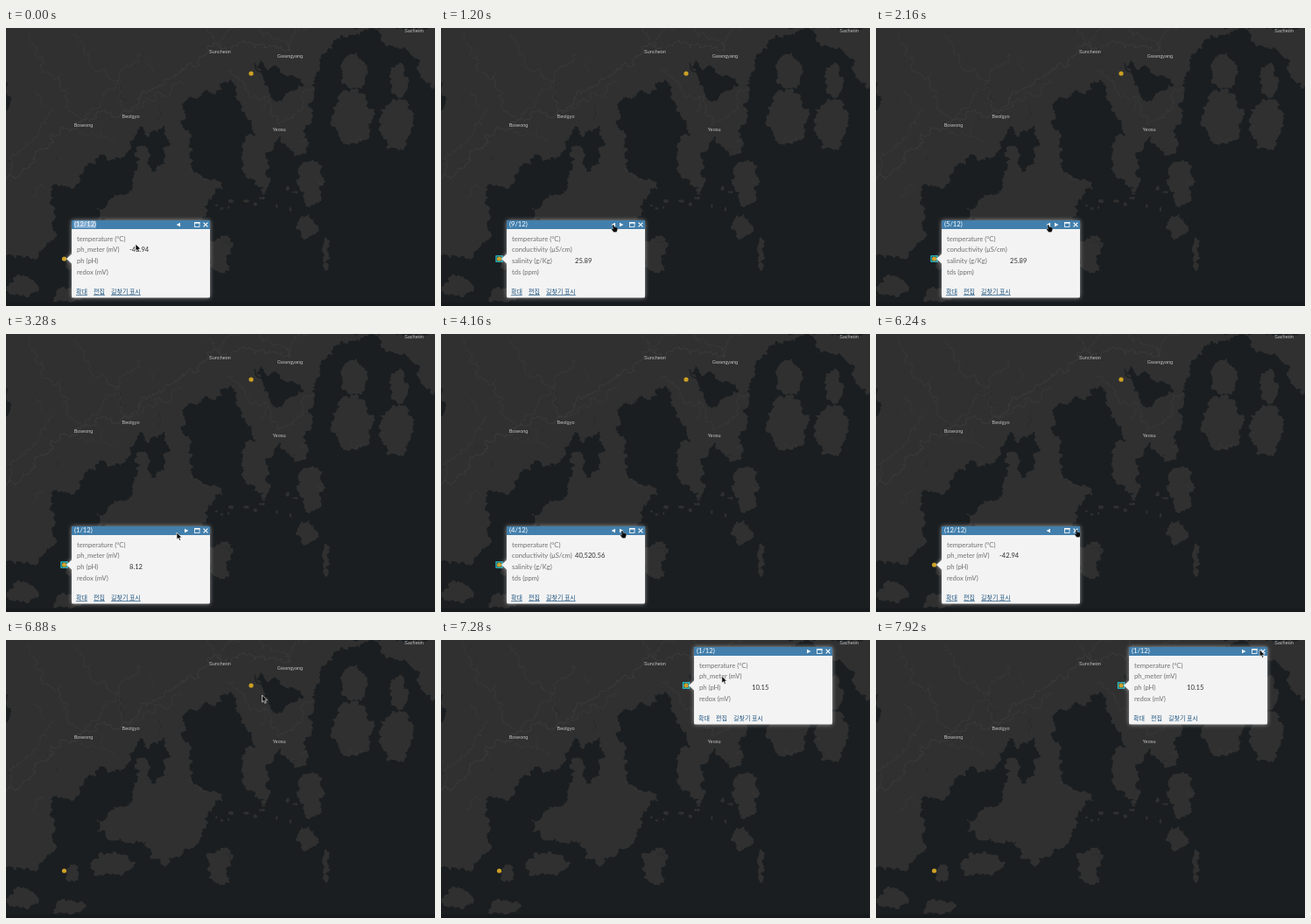
An HTML page with a canvas that plays this animation: 490 by 318 pixels, repeating every 8000 ms.

```html
<!DOCTYPE html>
<html lang="en">
<head>
<meta charset="utf-8">
<title>Sensor map</title>
<style>
  html, body { margin: 0; width: 490px; height: 318px; overflow: hidden; background: #1a1e21; }
  canvas { display: block; }
</style>
</head>
<body>
<canvas id="stage" width="490" height="318"></canvas>
<script>
const W = 490, H = 318, LOOP = 8000, STEP = 80;
const ctx = document.getElementById('stage').getContext('2d');

let seed = 4211;
const random = () => (seed = seed * 16807 % 2147483647) / 2147483647;
const points = text => text.split(' ').map(p => p.split(',').map(Number));
const clamp = (v, low, high) => Math.min(high, Math.max(low, v));

// ---------- map ----------
// A few corner points per coast; the jagged outline is generated.
const COASTS = [
  '-9,-9 300,-9 290,40 262,66 246,63 240,75 207,82 204,98 183,113 160,124 153,112 134,148 106,148 84,172 50,182 55,212 46,248 30,264 -9,268',
  '183,98 204,94 210,126 214,152 250,184 226,204 222,226 196,248 181,260 165,250 160,230 130,226 104,218 103,206 132,190 145,178 148,142 162,138 166,164 182,148',
  '270,40 290,46 304,84 340,66 352,76 346,136 334,146 314,124 296,146 300,180 280,172 268,136 284,124 270,90 262,64',
  '280,-9 500,-9 500,72 476,58 462,30 444,22 424,2 384,8 358,36 354,64 340,68 324,54 300,48 280,38'
];
// Islands: centre and radii.
const ISLANDS = [[398, 50, 15, 20], [396, 104, 23, 34], [450, 60, 10, 19], [445, 110, 20, 29], [349, 174, 16, 26],
  [121, 256, 25, 14], [245, 258, 14, 20], [344, 226, 12, 13], [365, 260, 4, 19], [76, 267, 8, 10], [18, 296, 19, 11], [72, 305, 18, 9]];
const TOWNS = [['Boseong', 88.5, 113], ['Beolgyo', 142.5, 103], ['Suncheon', 244.5, 29.2], ['Gwangyang', 324.5, 34],
  ['Yeosu', 312, 118.3], ['Sacheon', 466, 4.5]];

// Midpoint displacement; long edges stray no further than short ones.
function roughLine(g, a, b, amount) {
  const dx = b[0] - a[0], dy = b[1] - a[1], length = Math.hypot(dx, dy);
  if (length < 2.2) return g.lineTo(b[0], b[1]);
  const k = (random() - .5) * amount * Math.min(1, 16 / length);
  const mid = [(a[0] + b[0]) / 2 - dy * k, (a[1] + b[1]) / 2 + dx * k];
  roughLine(g, a, mid, amount);
  roughLine(g, mid, b, amount);
}

function roughPath(g, list, amount) {
  g.beginPath();
  g.moveTo(...list[0]);
  for (let i = 1; i < list.length; i++) roughLine(g, list[i - 1], list[i], amount);
}

function strokeRough(g, list, colour, width, amount) {
  roughPath(g, list, amount);
  g.strokeStyle = colour;
  g.lineWidth = width;
  g.stroke();
}

function fillLand(g, list) {
  roughPath(g, [...list, list[0]], .75);
  g.fill();
}

function fillIsland(g, x, y, rx, ry) {
  fillLand(g, Array.from({ length: 9 }, (_, i) => {
    const a = i / 9 * Math.PI * 2, r = .85 + random() * .3;
    return [x + Math.cos(a) * rx * r, y + Math.sin(a) * ry * r];
  }));
}

function newLayer() {
  const canvas = document.createElement('canvas');
  canvas.width = W;
  canvas.height = H;
  return canvas.getContext('2d');
}

function drawMap() {
  const g = newLayer(), m = newLayer();
  g.fillStyle = '#303030';
  COASTS.forEach(coast => fillLand(g, points(coast)));
  ISLANDS.forEach(island => fillIsland(g, ...island));
  for (let i = 0; i < 16; i++)
    fillIsland(g, 225 + random() * 110, 182 + random() * 26, 1 + random() * 3, 1 + random() * 2);

  g.globalCompositeOperation = 'source-atop';
  for (let i = 0; i < 130; i++) {
    const x = random() * W, y = random() * 270, a = random() * 6.3, length = 6 + random() * 22;
    const colour = i % 9 ? i % 3 ? '#2b2c2c' : '#353535' : '#222527';
    strokeRough(g, [[x, y], [x + Math.cos(a) * length, y + Math.sin(a) * length]], colour, .8, .9);
  }
  // roads: a chain through the towns and a side road out of each
  const chain = [[-5, 174], ...TOWNS.map(([, x, y]) => [x, y - 8])];
  strokeRough(g, chain.slice(0, 5), '#3c3c3c', .7, .8);
  for (const [x, y] of chain)
    for (const side of [-1, 1]) strokeRough(g, [[x, y], [x + side * 60, y - 30 - random() * 60]], '#393939', .6, .8);
  // harbour basin
  g.fillStyle = '#1e2224';
  fillLand(g, points('304,66 314,52 324,60 318,74 306,80'));
  strokeRough(g, points('284,40 306,74'), '#1e2224', 2, .3);

  m.fillStyle = '#1a1e21';
  m.fillRect(0, 0, W, H);
  m.drawImage(g.canvas, 0, 0);
  m.fillStyle = '#171a1d';
  m.fillRect(0, 314, W, 4);
  m.font = '5.5px "Liberation Sans", Arial, sans-serif';
  m.textAlign = 'center';
  m.fillStyle = '#c4c4c4';
  for (const town of TOWNS) m.fillText(...town);
  return m.canvas;
}
const map = drawMap();

// ---------- popup ----------
const PH = {
  fields: ['temperature (°C)', 'ph_meter (mV)', 'ph (pH)', 'redox (mV)'],
  values: ['17.85', '-42.94', '8.12', '182.40'], column: 66
};
const SALT = {
  fields: ['temperature (°C)', 'conductivity (μS/cm)', 'salinity (g/Kg)', 'tds (ppm)'],
  values: ['17.92', '40,520.56', '25.89', '25,894.10'], column: 78
};
const LATO = '7.6px Lato, sans-serif';
const CJK = '7px "Noto Sans CJK KR", "Noto Sans CJK", "Noto Sans CJK JP", sans-serif';

function text(string, x, y, colour, font) {
  ctx.font = font;
  ctx.fillStyle = colour;
  ctx.fillText(string, x, y);
}

function polygon(list, fill, stroke) {
  ctx.beginPath();
  for (const p of list) ctx.lineTo(...p);
  ctx.closePath();
  ctx.fillStyle = fill;
  ctx.fill();
  if (stroke) {
    ctx.strokeStyle = stroke;
    ctx.lineWidth = .8;
    ctx.stroke();
  }
}

const arrow = (x, dx) => polygon([[x + dx, 5], [x - dx, 2.7], [x - dx, 7.3]], '#fff');

function drawHeader(page, titleSelected) {
  ctx.fillStyle = '#427fac';
  ctx.fillRect(0, 0, 158, 10);
  if (titleSelected) {
    ctx.fillStyle = '#7fabd0';
    ctx.fillRect(2.5, .5, 25, 8.5);
  }
  text(`(${page}/12)`, 3, 7.4, '#fff', LATO);
  if (page > 1) arrow(121.8, -2.2);
  if (page < 12) arrow(131.2, 2.2);
  ctx.strokeStyle = ctx.fillStyle = '#fff';
  ctx.lineWidth = .8;
  ctx.strokeRect(140.5, 2.5, 5.5, 5);
  ctx.fillRect(140, 2, 6.5, 1.6);
  ctx.lineWidth = 1.2;
  ctx.beginPath();
  for (const s of [-2.4, 2.4]) {
    ctx.moveTo(153 - s, 2.6);
    ctx.lineTo(153 + s, 7.4);
  }
  ctx.stroke();
}

function drawPopup(x, y, page, { value, titleSelected, underline }) {
  const sensor = page > 2 && page < 11 ? SALT : PH;
  const row = (page + 1) % 4;
  const rowY = i => 23.7 + i * 12.7;
  ctx.save();
  ctx.translate(x, y);
  ctx.shadowColor = 'rgba(255,255,255,.55)';
  ctx.shadowBlur = 5;
  ctx.fillStyle = '#f3f3f3';
  ctx.beginPath();
  ctx.roundRect(0, 0, 158, 88.5, 1.5);
  ctx.fill();
  polygon([[.5, 38], [-6, 44], [.5, 50]], '#f3f3f3');
  ctx.shadowBlur = 0;
  drawHeader(page, titleSelected);
  sensor.fields.forEach((field, i) => text(field, 6, rowY(i), '#707070', LATO));
  text(value || sensor.values[row], sensor.column, rowY(row), '#303030', LATO);
  ['확대', '편집', '길찾기 표시'].forEach((label, i) => {
    const left = 5 + i * 20;
    text(label, left, 84.2, '#1f5580', CJK);
    if (underline) ctx.fillRect(left, 85.2, ctx.measureText(label).width, .7);
  });
  ctx.restore();
}

function drawSite(x, y, selected) {
  ctx.beginPath();
  ctx.arc(x, y, 2.6, 0, 7);
  ctx.fillStyle = '#cda024';
  ctx.fill();
  if (!selected) return;
  ctx.strokeStyle = '#27c3cf';
  ctx.lineWidth = 1.3;
  ctx.strokeRect(x - 3.5, y - 3.2, 7, 6.4);
}

// ---------- pointer ----------
// time, position, and whether it is a hand until the next stop
const STOPS = [[0, 148, 247], [560, 197, 225, true], [3120, 197, 225], [3280, 195, 227], [3440, 195, 227], [3600, 207, 225, true],
  [5760, 207, 225], [6160, 229, 224, true], [6400, 229, 224], [6880, 292.5, 63], [7040, 279, 51, true], [7200, 279, 51],
  [7440, 440, 13], [LOOP, 438, 11]];
const HAND = points('-1,0 .5,0 1,2.6 4,3 4.8,4.4 4.2,7 3.4,8.6 .2,8.6 -2.2,5.6 -1.9,4.6 -.5,5.2');
const ARROW = points('0,0 0,8 1.9,6.4 3.2,9.3 4.6,8.7 3.4,5.9 5.8,5.8');

function drawPointer(t) {
  const i = STOPS.findIndex(([time]) => time > t);
  const [t0, x0, y0, hand] = STOPS[i - 1], [t1, x1, y1] = STOPS[i];
  const u = (t - t0) / (t1 - t0), e = u * u * (3 - 2 * u);
  ctx.save();
  ctx.translate(x0 + (x1 - x0) * e, y0 + (y1 - y0) * e);
  if (hand) polygon(HAND, '#0a0a0a', 'rgba(255,255,255,.3)');
  else polygon(ARROW, '#0a0a0a', 'rgba(255,255,255,.8)');
  ctx.restore();
}

// ---------- timeline ----------
const CLOSE = 6400, OPEN = 7200;
const clicks = (t, first, interval) => clamp(Math.floor((t - first) / interval) + 1, 0, 11);

function draw(now) {
  const t = Math.floor(now % LOOP / STEP) * STEP;
  const page = 12 - clicks(t, 720, 240) + clicks(t, 3600, 216);
  const first = t < CLOSE, second = t >= OPEN;
  ctx.drawImage(map, 0, 0);
  drawSite(66.5, 264, first && page < 12);
  drawSite(280, 52, second);
  if (first) drawPopup(75, 220, page, { titleSelected: t < 720, underline: true });
  if (second) drawPopup(289, 8, 1, { value: '10.15' });
  drawPointer(t);
}

const start = performance.now();
function tick() {
  draw(performance.now() - start);
  requestAnimationFrame(tick);
}
tick();
</script>
</body>
</html>
```
